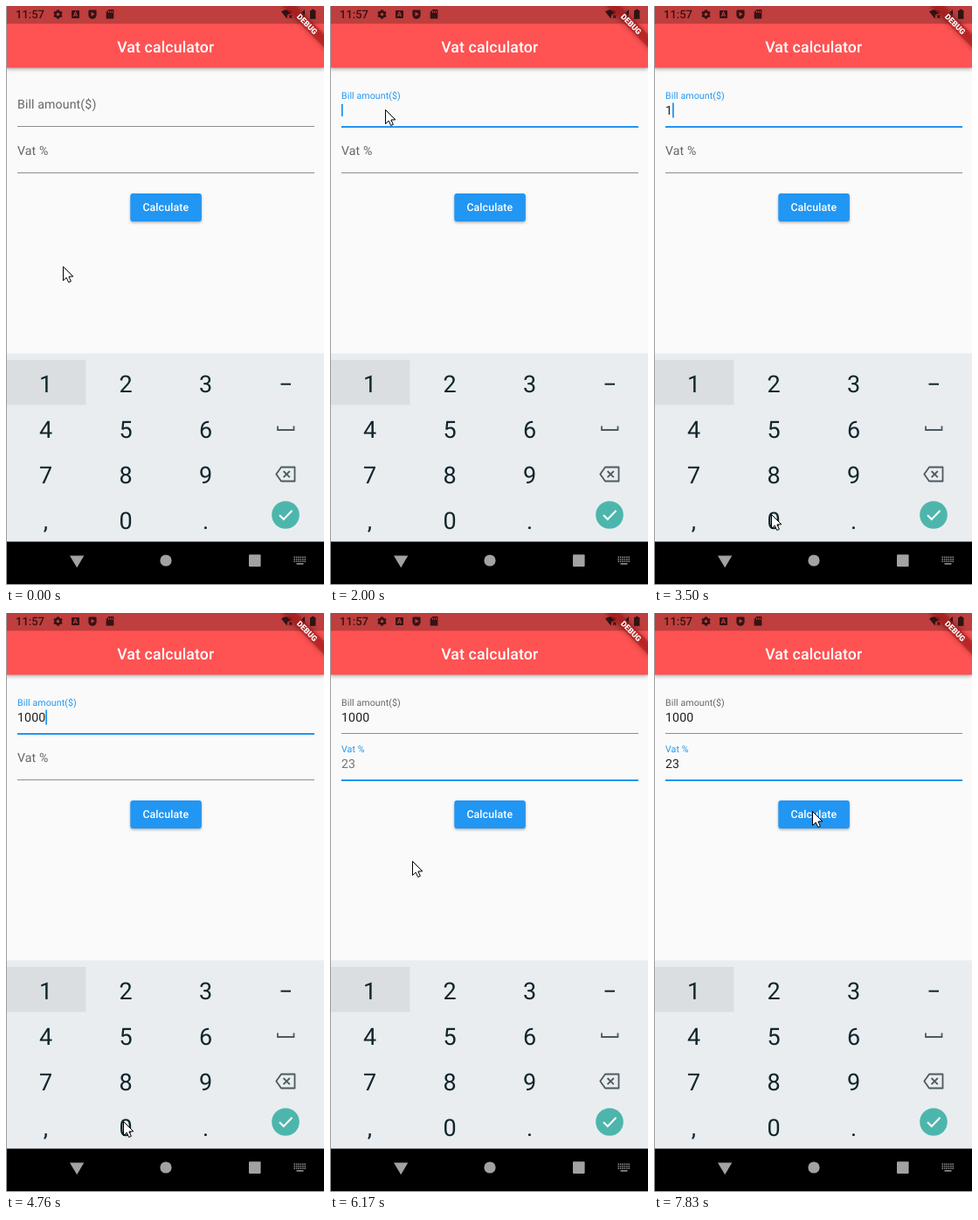
These frames come from a looping animation (364x661 px, 8 s). An HTML page with a canvas:

```html
<!DOCTYPE html>
<html lang="en">
<head>
<meta charset="utf-8">
<title>Vat calculator</title>
<style>
html, body { margin: 0; width: 100%; height: 100%; overflow: hidden; background: #fafafa; }
canvas { display: block; }
</style>
</head>
<body>
<canvas id="stage" width="364" height="661"></canvas>
<script>
const ctx = document.getElementById('stage').getContext('2d');
const LOOP = 8000, W = 364, H = 661;
const STEP = 120;   // the picture refreshes at this pace while something moves
const LAG = 250;    // delay from a tap to the field reacting
const BLINK = 500;
const BLUE = '#2196f3', INK = '#212121', HINT = '#666666', KEY = '#10262c', STATUS = '#341313', BAR = '#bf3d3d';

// Pointer stops: each is reached in a few eased refreshes.
const home = { x: 65, y: 297 };
const moves = [
  { from: 840, steps: 2, x: 59, y: 218 },
  { from: 1110, steps: 3, x: 63, y: 118 },
  { from: 2250, steps: 3, x: 63, y: 451 },
  { from: 2900, steps: 6, x: 134, y: 580 },
  { from: 5010, steps: 3, x: 48, y: 176 },
  { from: 6170, steps: 6, x: 158, y: 431 },
  { from: 6950, steps: 2, x: 226, y: 424 },
  { from: 7440, steps: 4, x: 181, y: 226 }
];

const fields = [
  { label: 'Bill amount($)', y: 0, tap: 1630, typed: '1000', keys: [3020, 3860, 4300, 4760] },
  { label: 'Vat %', y: 53, tap: 5490, typed: '23', keys: [6950, 7320], hint: '23' }
];

const mix = (a, b, p) => a + (b - a) * p;
const easeOut = p => 1 - (1 - p) ** 3;

// Progress from 0 to 1 in whole refreshes.
function stepped(t, from, steps) {
  const done = Math.floor((t - from) / STEP) + 1;
  return Math.min(1, Math.max(0, done / steps));
}

function pointerAt(t) {
  let { x, y } = home;
  for (const m of moves) {
    const p = easeOut(stepped(t, m.from, m.steps));
    x = mix(x, m.x, p);
    y = mix(y, m.y, p);
  }
  return [Math.round(x), Math.round(y)];
}

function rect(x, y, w, h, color) {
  ctx.fillStyle = color;
  ctx.fillRect(x, y, w, h);
}

function round(x, y, w, h, r, color) {
  ctx.fillStyle = color;
  ctx.beginPath();
  ctx.roundRect(x, y, w, h, r);
  ctx.fill();
}

function disc(x, y, r, color) {
  ctx.fillStyle = color;
  ctx.beginPath();
  ctx.arc(x, y, r, 0, Math.PI * 2);
  ctx.fill();
}

function trace(points, close) {
  ctx.beginPath();
  for (const [x, y] of points) ctx.lineTo(x, y);
  if (close) ctx.closePath();
}

function fillShape(points, color) {
  trace(points, true);
  ctx.fillStyle = color;
  ctx.fill();
}

function line(points, color, width, close) {
  trace(points, close);
  ctx.strokeStyle = color;
  ctx.lineWidth = width;
  ctx.stroke();
}

function cross(x, y, r, color, width) {
  line([[x - r, y - r], [x + r, y + r]], color, width);
  line([[x + r, y - r], [x - r, y + r]], color, width);
}

function text(str, x, y, size, color, { weight = 400, align = 'left', gap = 0.13 } = {}) {
  ctx.font = `${weight} ${size}px Roboto, sans-serif`;
  ctx.textRendering = 'geometricPrecision';
  ctx.letterSpacing = gap + 'px';
  ctx.textAlign = align;
  ctx.fillStyle = color;
  ctx.fillText(str, x, y);
}

function shadow(color, blur, dy) {
  ctx.shadowColor = color;
  ctx.shadowBlur = blur;
  ctx.shadowOffsetY = dy;
}

function drawBanner() {
  ctx.save();
  ctx.translate(366, -0.6);
  ctx.rotate(Math.PI / 4);
  shadow('rgba(0,0,0,0.5)', 6, 0);
  rect(-36, 24.7, 72, 10.6, 'rgba(183,28,28,0.63)');
  shadow('transparent', 0, 0);
  text('DEBUG', 0, 33.2, 9, '#fff', { weight: 900, align: 'center', gap: 0 });
  ctx.restore();
}

function drawGear(x, y) {
  ctx.strokeStyle = STATUS;
  ctx.lineWidth = 2.6;
  ctx.beginPath();
  ctx.arc(x, y, 3.1, 0, Math.PI * 2);
  ctx.stroke();
  for (let i = 0; i < 6; i++) {
    const a = (i + 0.5) * Math.PI / 3, c = Math.cos(a), s = Math.sin(a);
    line([[x + 3 * c, y + 3 * s], [x + 5.3 * c, y + 5.3 * s]], STATUS, 2.2);
  }
}

function drawStatusIcons() {
  text('11:57', 11, 14.2, 13, STATUS, { weight: 500, gap: 0 });
  drawGear(59.5, 9.5);

  // letter tile
  round(75, 5, 9, 9, 1, STATUS);
  text('A', 79.5, 12.4, 8, BAR, { weight: 700, align: 'center', gap: 0 });

  // shield
  round(94.4, 4.6, 9.2, 10.2, [1.5, 1.5, 5, 5], STATUS);
  fillShape([[97.5, 6.8], [101.8, 9.3], [97.5, 11.8]], BAR);

  // memory card
  fillShape([[117.5, 4], [123.3, 4], [123.3, 14.5], [114.7, 14.5], [114.7, 7]], STATUS);
  for (let i = 0; i < 3; i++) rect(117 + i * 2, 5.5, 1, 2.3, BAR);

  // wifi
  ctx.fillStyle = STATUS;
  ctx.beginPath();
  ctx.moveTo(321.5, 14.5);
  ctx.arc(321.5, 14.5, 10.3, -Math.PI * 0.715, -Math.PI * 0.285);
  ctx.lineTo(325.6, 9.3);
  ctx.lineTo(322.6, 9.3);
  ctx.fill();
  cross(325.7, 12.2, 1.7, STATUS, 1.1);

  // signal, battery
  fillShape([[342, 4], [342, 14.5], [331.5, 14.5]], STATUS);
  rect(348, 5, 6.5, 9.8, STATUS);
  rect(349.8, 3.8, 3, 1.4, STATUS);
}

function drawHeader() {
  ctx.save();
  shadow('rgba(0,0,0,0.4)', 5, 1.8);
  rect(0, -10, W, 80.5, '#ff5252');
  ctx.restore();
  text('Vat calculator', 127.2, 52.6, 17.66, '#fff', { weight: 500 });
  rect(0, 0, W, 20.3, 'rgba(0,0,0,0.25)');
  drawStatusIcons();
  drawBanner();
}

function drawField(f, t, focused) {
  const pressed = f.keys.filter(k => k <= t);
  const value = f.typed.slice(0, pressed.length);
  const lift = stepped(t, f.tap + LAG, 2);

  text(f.label, 13, f.y + mix(116.6, 106, lift), mix(14.13, 10.6, lift),
    focused ? BLUE : HINT, { gap: mix(0.13, 0.1, lift) });
  rect(13, f.y + 137, 340, focused ? 2 : 1, focused ? BLUE : '#8e8e8e');

  const shown = value || (lift === 1 && f.hint);
  if (shown) text(shown, 13, f.y + 124, 14.13, value ? INK : '#757575');

  // The caret restarts its blink at every tap and key.
  const active = pressed.pop() || f.tap;
  if (focused && (t - active) % (2 * BLINK) < BLINK) {
    const inset = value ? 0 : 1.5;
    rect(13 + value.length * 8.06, f.y + 110.5 + inset, 1.8, 17 - 2 * inset, BLUE);
  }
}

function drawForm(t) {
  const current = fields.filter(f => t >= f.tap + LAG).pop();
  for (const f of fields) drawField(f, t, f === current);

  ctx.save();
  shadow('rgba(0,0,0,0.3)', 3, 1.5);
  round(142.3, 214, 81.6, 32, 3, BLUE);
  ctx.restore();
  text('Calculate', 156.4, 234.4, 12.36, '#fff', { weight: 500, gap: 0.1 });
}

function drawKeyboard() {
  rect(0, 396.5, W, 215, '#e9edf0');
  rect(0, 404, 91.3, 51.3, '#dadee1');
  ['123', '456', '789', ',0.'].forEach((row, r) => {
    [...row].forEach((key, c) => {
      text(key, 45.5 + c * 91.5, 440.9 + r * 51.9, 27, KEY, { align: 'center', gap: 0 });
    });
  });
  rect(314.5, 430.7, 11.5, 2, KEY);

  const grey = '#4c5a60';
  line([[311, 479.5], [311, 484], [329.5, 484], [329.5, 479.5]], grey, 1.8);
  ctx.lineJoin = 'round';
  line([[315, 526.5], [330.5, 526.5], [330.5, 542.5], [315, 542.5], [309.3, 534.5]], grey, 1.8, true);
  cross(321.2, 534.6, 3.6, grey, 1.8);
  ctx.lineJoin = 'miter';

  disc(320, 581, 15.8, '#4db6ac');
  line([[313, 581.3], [317.8, 586], [327.5, 576]], '#fff', 2);
}

function drawNav() {
  const grey = '#a2a2a2', dim = '#929292';
  rect(0, 611.5, W, H, '#000');
  fillShape([[73, 627.5], [89.3, 627.5], [81.2, 641.3]], grey);
  disc(183, 633, 6.6, grey);
  round(278, 626.3, 13.6, 13.6, 1, grey);
  for (let i = 0; i < 18; i++) {
    rect(329.5 + i % 6 * 2.4, 628.5 + Math.floor(i / 6) * 2.4, 1.5, 1.5, dim);
  }
  rect(332.5, 636, 8, 1.6, dim);
}

function drawPointer(x, y) {
  ctx.save();
  ctx.translate(x + 0.5, y + 0.5);
  const arrow = [[0, 0], [0, 16], [3.7, 12.6], [6.2, 18], [8.9, 16.8], [6.4, 11.5], [11.3, 11.3]];
  fillShape(arrow, '#fff');
  line(arrow, '#000', 1, true);
  ctx.restore();
}

function draw(t) {
  rect(0, 0, W, H, '#fafafa');
  drawHeader();
  drawForm(t);
  drawKeyboard();
  drawNav();
  rect(0, 0, 1, H, '#9c9c9c');
  rect(0, H - 1, W, 1, '#b4b4b4');
  drawPointer(...pointerAt(t));
}

const start = performance.now();
function tick() {
  draw((performance.now() - start) % LOOP);
  requestAnimationFrame(tick);
}
tick();
</script>
</body>
</html>
```
